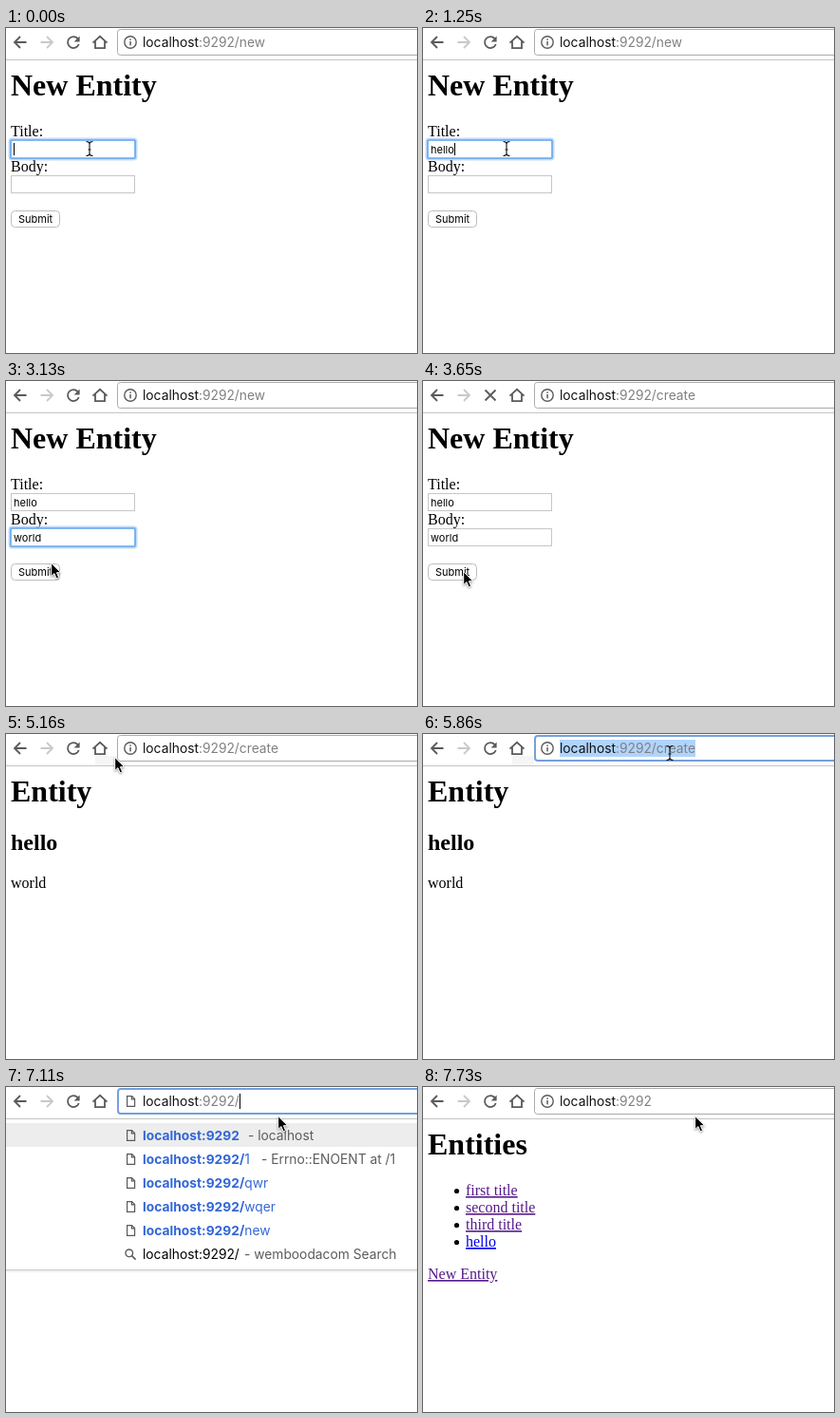
An HTML page that plays this animation: 433 by 342 pixels, repeating every 8 s.

```html
<!DOCTYPE html>
<html lang="en">
<head>
<meta charset="utf-8">
<title>New Entity</title>
<style>
  html, body { margin: 0; width: 100%; height: 100%; overflow: hidden; background: #fff; }
  svg { display: block; width: 433px; height: 342px; }
  text { white-space: pre; font: 16px "Liberation Serif", Times, serif; }
  text.h1 { font-size: 32px; font-weight: bold; }
  text.h2 { font-size: 24px; font-weight: bold; }
  text.field { font: 11px Inter, Roboto, sans-serif; }
  text.bar { font: 13.8px Inter, Roboto, sans-serif; }
  .link { text-decoration: underline; }
  .icon { fill: none; stroke: #5a5a5a; stroke-width: 1.8; }
  .arrow { stroke: #fff; stroke-width: 1; filter: drop-shadow(0 1px 1px #0006); }
</style>
</head>
<body>
<svg id="stage" viewBox="0 0 433 342"></svg>
<script>
const LOOP = 8000;
const stage = document.getElementById('stage');
const pen = document.createElement('canvas').getContext('2d');

// Each track lists [start, value...]; the latest started entry holds.
const title = [[0, ''], [710, 'h'], [800, 'he'], [890, 'hel'], [1070, 'hell'], [1250, 'hello']];
const body = [[0, ''], [1790, 'w'], [1880, 'wo'], [2060, 'wor'], [2150, 'worl'], [2230, 'world']];
const focus = [[0, 'title'], [1520, 'body'], [3480, '']];
const caret = [[0, true], [450, false], [710, true], [2770, false], [3210, true]];
const page = [[0, 'form'], [3730, 'entity'], [7110, 'menu'], [7560, 'entity'], [7650, 'list']];
const path = [[0, '/new'], [3560, '/create'], [7110, '/'], [7560, '']];
const select = [[0, ''], [5860, 'all'], [5950, 'caret'], [6040, 'word'], [7110, 'caret'], [7560, '']];
const busy = [[0, false], [3560, true], [3820, false], [7560, true], [7730, false]];
const pointer = [
  [0, 88, 127, 'beam'], [2770, 87, 127, 'beam'],
  [2950, 78, 142], [3030, 62, 170], [3120, 48, 192], [3210, 43, 201],
  [4530, 48, 180], [4620, 66, 120], [4710, 86, 60], [4800, 97, 30],
  [5160, 115, 25], [5250, 140, 31], [5340, 168, 33], [5430, 195, 32], [5510, 218, 30],
  [5600, 238, 24, 'beam'], [5690, 252, 21, 'beam'], [5780, 260, 20, 'beam'],
  [5950, 261, 23, 'beam'], [6040, 262, 18, 'beam'],
  [6220, 268, 14, 'beam'], [6310, 279, 23], [6400, 287, 31]
];

const entry = (track, t) => track.findLast(e => e[0] <= t);
const at = (track, t) => entry(track, t)[1];

function textWidth(s, size) {
  pen.font = `${size}px Inter, Roboto, sans-serif`;
  return pen.measureText(s).width;
}
const text = (x, y, s, cls = '', fill = '#000') =>
  `<text x="${x}" y="${y}" class="${cls}" fill="${fill}">${s}</text>`;
const span = (s, fill, weight = 400) =>
  `<tspan fill="${fill}" font-weight="${weight}" style="font-weight:${weight}">${s}</tspan>`;
const rect = (x, y, w, h, fill, more = '') =>
  `<rect x="${x}" y="${y}" width="${w}" height="${h}" fill="${fill}" ${more}/>`;
const icon = (d, more = '') => `<path class="icon" d="${d}" ${more}/>`;
const sheet = y => icon(`M127.6 ${y - 5.4}h5l3 3v7.8h-8zM132.4 ${y - 5.4}v3.2h3.2`, 'style="stroke-width:1.2"');

function input(y, value, focused, caretOn) {
  const ring = focused
    ? rect(4.5, y - .5, 132, 20, 'none', 'rx="2" stroke="#8cc0fa" stroke-opacity=".55" stroke-width="4"') +
      rect(5, y, 131, 19, '#fff', 'rx="1" stroke="#62a5ee" stroke-width="1.6"')
    : rect(5.5, y + .5, 130, 18, '#fff', 'stroke="#c6c6c6"');
  const mark = focused && caretOn
    ? rect(Math.round(8 + textWidth(value, 11)), y + 3, 1, 13, '#000') : '';
  return ring + text(8, y + 14, value, 'field') + mark;
}

function form(t) {
  const on = at(caret, t), active = at(focus, t);
  const pressed = t >= 3480 && t < 3650;
  return text(5, 71, 'New Entity', 'h1') +
    text(5, 114, 'Title:') + text(5, 151, 'Body:') +
    input(118, at(title, t), active === 'title', on) +
    input(155, at(body, t), active === 'body', on) +
    rect(5.5, 192.5, 51, 17, pressed ? '#7db5f8' : '#fff',
      `rx="4" stroke="${pressed ? '#4d8be0' : '#bdbdbd'}"`) +
    text(13, 205, 'Submit', 'field');
}

const entity = () =>
  text(5, 71, 'Entity', 'h1') + text(5, 122, 'hello', 'h2') + text(5, 162, 'world');

function list() {
  const items = ['first title', 'second title', 'third title', 'hello'];
  return text(5, 71, 'Entities', 'h1') +
    items.map((s, i) => `<circle cx="35.5" cy="${109.5 + 18 * i}" r="2.6"/>` +
      text(45, 114 + 18 * i, s, 'link', i < 3 ? '#551a8b' : '#0000ee')).join('') +
    text(5, 202, 'New Entity', 'link', '#551a8b');
}

function menu() {
  const blue = '#3367d6', gray = '#5c5c5c', host = 'localhost:9292';
  const rows = [
    [host, '', 255, 'localhost'], [host + '/', '1', 269, 'Errno::ENOENT at /1'],
    [host + '/', 'qwr'], [host + '/', 'wqer'], [host + '/', 'new']
  ];
  return rect(0, 38, 433, 25, '#ededed') +
    rows.map(([bold, rest, x, note], i) => {
      const y = 56 + 25 * i;
      return sheet(y - 5) + text(144, y, span(bold, blue, 700) + span(rest, blue), 'bar') +
        (note ? text(x, y, '- ' + note, 'bar', gray) : '');
    }).join('') +
    '<circle class="icon" cx="129.8" cy="174.8" r="3.8" style="stroke-width:1.4"/>' +
    icon('M132.6 177.6l4 4', 'style="stroke-width:1.6"') +
    text(144, 181, host + '/', 'bar') + text(251, 181, '- wemboodacom Search', 'bar', gray) +
    rect(0, 192, 433, 1, '#c9c9c9') + rect(0, 193, 433, 2, '#f1f1f1');
}

function toolbar(t) {
  const sel = at(select, t), tail = at(path, t);
  const urlX = s => 144 + textWidth(s, 13.8);
  const end = urlX('localhost:9292' + tail), slash = urlX('localhost:9292/');
  const start = sel === 'all' ? 144 : slash;
  const reload = at(busy, t)
    ? icon('M65.5 9.5l11 11M76.5 9.5l-11 11')
    : icon('M75.6 11.2A6 6 0 1 0 76.7 17') + '<path d="M77.6 8.6v6h-6z" fill="#5a5a5a"/>';
  const badge = at(page, t) === 'menu' ? sheet(15)
    : '<circle class="icon" cx="131" cy="15" r="6.2" style="stroke-width:1.4"/>' +
      rect(130.3, 14, 1.5, 4.4, '#5a5a5a') + rect(130.3, 11.4, 1.5, 1.5, '#5a5a5a');
  return (t >= 5160 && t < 7110 ? rect(94, 23, 23, 10, '#f5f5f5') : '') +
    rect(0, 33, 433, 1, '#c4c4c4') +
    icon('M21.5 15H9.5M15 9l-6 6 6 6') +
    icon('M36.5 15h12M43 9l6 6-6 6', 'style="stroke:#c9c9c9"') + reload +
    icon('M91.5 15.6L99 8.8l7.5 6.8M94 14v7.2h10V14') +
    (sel ? rect(118, 2, 330, 26, '#fff', 'rx="3" stroke="#74a0dc" stroke-width="2"')
         : rect(117.5, 1.5, 330, 27, '#fff', 'rx="3" stroke="#ababab"')) +
    badge +
    (sel === 'all' || sel === 'word' ? rect(start, 6, end - start, 18, '#b0d4fc') : '') +
    text(144, 20, span('localhost', '#111') + span(':9292' + tail, '#808080'), 'bar') +
    (sel === 'caret' ? rect(Math.round(slash), 7, 1, 16, '#000') : '');
}

function cursor(t) {
  const [, x, y, kind] = entry(pointer, t);
  const beam = 'M-3.5-7.5q3 0 3.5 2 .5-2 3.5-2M0-5.5v11M-3.5 7.5q3 0 3.5-2 .5 2 3.5 2M-1.5 1h3';
  const shape = kind
    ? `<path d="${beam}" fill="none" stroke="#111" stroke-width="1.1"/>`
    : '<path class="arrow" d="M-.3-.5V13.6l3.2-3 2.2 5.2 2.5-1.1-2.2-5h4.4z"/>';
  return `<g transform="translate(${x} ${y})">${shape}</g>`;
}

const pages = { form, entity, list, menu };
let shown = '';

function frame(now) {
  const t = now % LOOP;
  const picture = toolbar(t) + pages[at(page, t)](t) + cursor(t);
  if (picture !== shown) stage.innerHTML = shown = picture;
  requestAnimationFrame(frame);
}
frame(performance.now());
</script>
</body>
</html>
```
